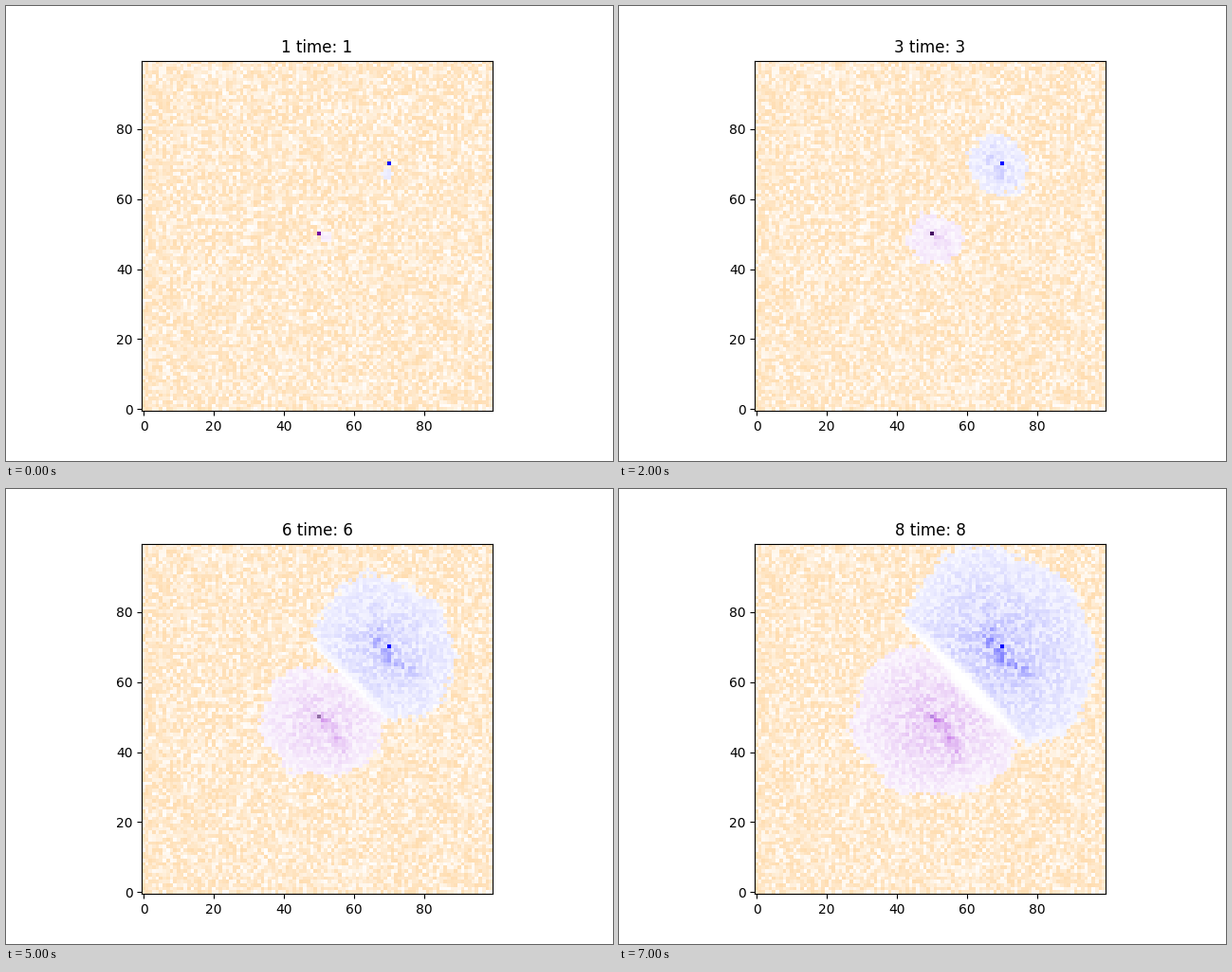
These frames come from a looping animation (640 by 480 pixels, 8000 ms). A matplotlib script:

```python
import numpy as np
import matplotlib.pyplot as plt
from matplotlib.animation import FuncAnimation

SIZE = 100
FRAMES = 8
BORDER = 119  # the two colonies meet where x + y equals this

rng = np.random.default_rng(7)
Y, X = np.mgrid[:SIZE, :SIZE]


def noise(low, high):
    return rng.uniform(low, high, (SIZE, SIZE))


def tint(rgb, alpha):
    """Blend a colour over white with a per-cell alpha."""
    return 1 - alpha[..., None] * (1 - np.array(rgb) / 255)


def near_curve(start, bend, end):
    """Soft glow along a quadratic curve."""
    glow = np.zeros((SIZE, SIZE))
    for s in np.linspace(0, 1, 20):
        x, y = ((1 - s) ** 2 * a + 2 * s * (1 - s) * b + s * s * c
                for a, b, c in zip(start, bend, end))
        glow = np.maximum(glow, np.exp(-((X - x) ** 2 + (Y - y) ** 2) / 3))
    return glow


class Colony:
    """A lumpy disc that spreads at a steady speed from its birth time."""

    def __init__(self, rgb, center, radius, stretch, axis, t0, start, trail):
        self.rgb = rgb
        dx, dy = X - center[0], Y - center[1]
        angle = np.arctan2(dy, dx)
        edge = radius + stretch * np.cos(2 * (angle - np.radians(axis)))
        for k in range(3, 9):
            edge += 0.4 * np.sin(k * angle + rng.uniform(0, 2 * np.pi))
        reach = np.hypot(dx, dy) / edge
        self.birth = t0 + (FRAMES - t0) * reach + noise(-0.3, 0.3)
        self.birth = np.maximum(self.birth, 1.1)
        self.birth[np.hypot(X - start[0], Y - start[1]) < 1.7] = 1
        self.grain = noise(0.35, 1.6)
        self.heat = 1 + 1.3 * near_curve(*trail)

    def paint(self, grid, t, side):
        alive = (self.birth <= t) & (side * (X + Y - BORDER) >= 0)
        age = np.clip(t - self.birth, 0, None)
        alpha = (0.055 + 0.018 * age * self.heat) * self.grain
        # The contact line bleaches wider the longer it has been contested.
        bleach = np.clip((np.abs(X + Y - BORDER) - 0.8 * age + 1) / 3, 0, 1)
        grid[alive] = tint(self.rgb, alpha * bleach)[alive]


soil = tint((255, 145, 0), 0.31 * noise(0, 1) ** 0.75)

blue = Colony((0, 0, 255), (69, 69.5), 28, 1.8, 130, 0.8, (69.5, 67),
              [(66, 74), (67, 66), (78, 63)])
violet = Colony((148, 0, 211), (51, 48.5), 22.7, 1.5, -10, 0.5, (52, 49),
                [(49, 50), (55, 48), (57, 38)])


def nest_color(t):
    """The violet nest darkens, then fades as its stock runs out."""
    if t < 2:
        return 115, 10, 160
    if t < 6:
        return 68, 12, 97
    return (145, 110, 165) if t < 8 else (185, 135, 225)


def world(t):
    grid = soil.copy()
    violet.paint(grid, t, -1)
    blue.paint(grid, t, 1)
    grid[50, 50] = np.array(nest_color(t)) / 255
    grid[70, 70] = 0, 0, 1
    return grid


fig, ax = plt.subplots(figsize=(6.4, 4.8), dpi=100)
image = ax.imshow(world(1), origin="lower", interpolation="nearest")
ax.set_xticks(range(0, SIZE, 20))
ax.set_yticks(range(0, SIZE, 20))
title = ax.set_title("1 time: 1")


def update(frame):
    t = frame + 1
    image.set_data(world(t))
    title.set_text(f"{t} time: {t}")
    return image, title


anim = FuncAnimation(fig, update, frames=FRAMES, interval=1000,
                     repeat=True, repeat_delay=0, blit=False)
plt.show()
```
